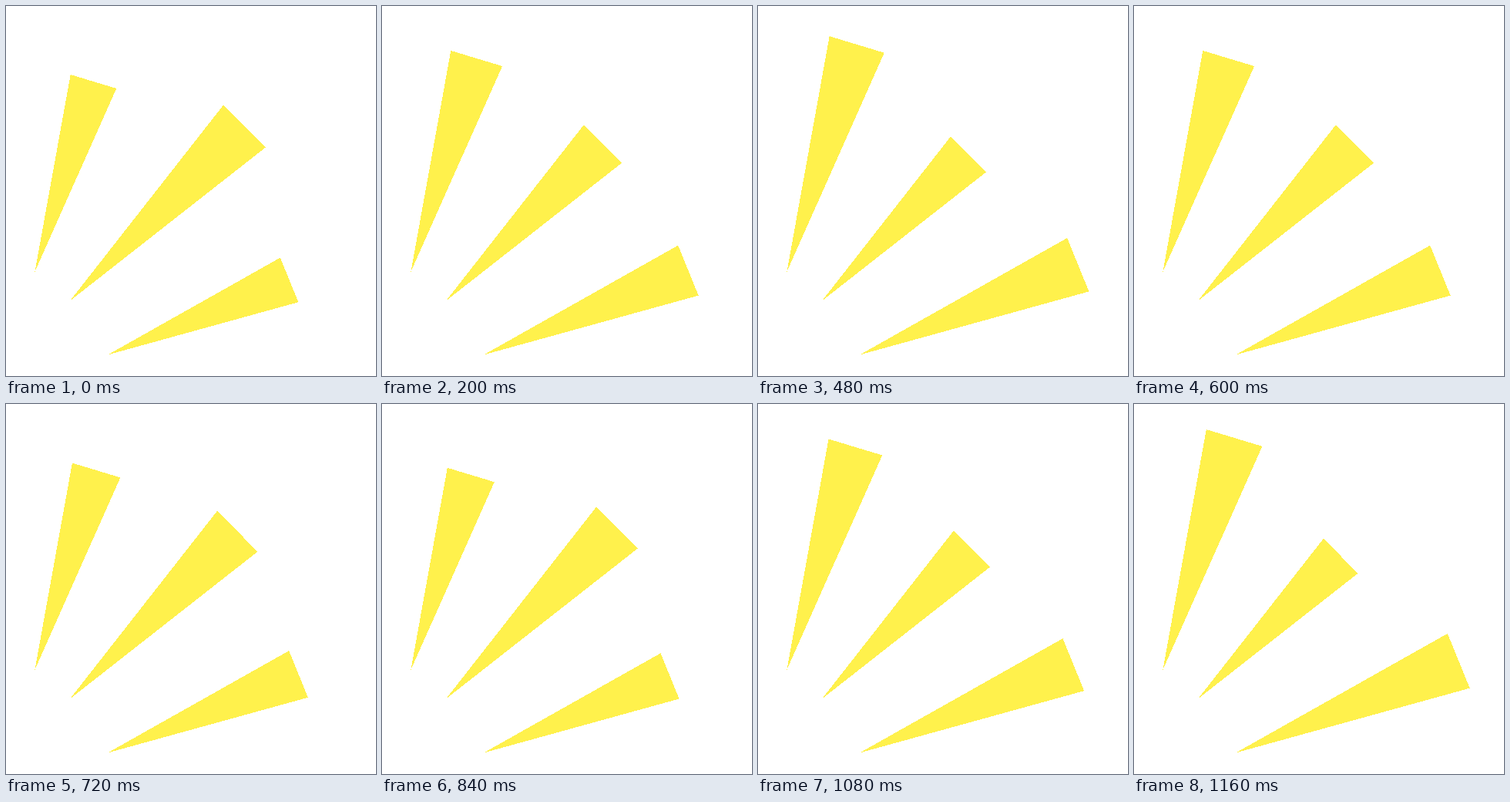
Animation of 480 by 480 pixels, one loop 1200 ms. Source, as an HTML page:

```html
<!DOCTYPE html>
<html>
<head>
<meta charset="utf-8">
<style>
html, body { margin: 0; width: 100%; height: 100%; overflow: hidden; background: #fff; }
svg { display: block; width: 100%; height: 100%; }
</style>
</head>
<body>
<svg viewBox="0 0 480 480" fill="#fff14c" shape-rendering="crispEdges"></svg>
<script>
const LOOP = 1200, SWING = 400, STEP = 40;

// tip, the two far corners relative to the tip, and the scale at full swing
const rays = [
  { tip: [37.4, 345], a: [46.3, -256], b: [105.8, -238], end: 1.243 },
  { tip: [83, 382.5], a: [199, -254], b: [253.7, -199], end: 0.798 },
  { tip: [132, 452.5], a: [223.8, -126], b: [247.3, -68.3], end: 1.253 }
];

const svg = document.querySelector('svg');
for (const ray of rays) {
  ray.node = document.createElementNS(svg.namespaceURI, 'polygon');
  svg.append(ray.node);
}

function draw(now) {
  const t = Math.floor((now % LOOP) / STEP) * STEP;
  const swing = 1 - Math.abs((t % (2 * SWING)) / SWING - 1);
  for (const { tip, a, b, end, node } of rays) {
    const scale = 1 + (end - 1) * swing;
    const corner = ([x, y]) => [tip[0] + x * scale, tip[1] + y * scale];
    node.setAttribute('points', [tip, corner(a), corner(b)].join(' '));
  }
}

let start;
function tick(now) {
  start ??= now;
  draw(now - start);
  requestAnimationFrame(tick);
}
draw(0);
requestAnimationFrame(tick);
</script>
</body>
</html>
```
